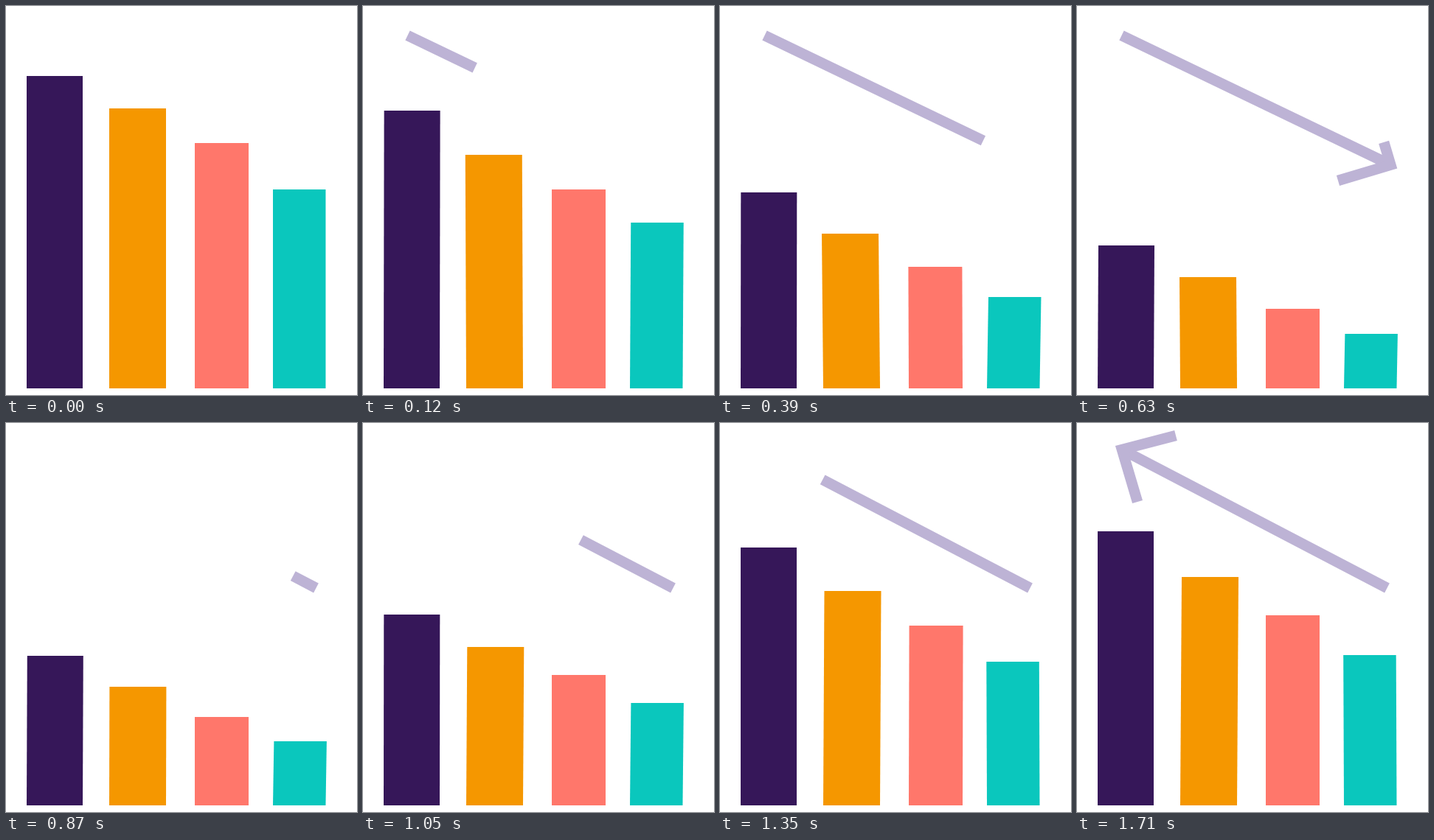
Write an HTML page with a canvas that moves like this. It is 476 by 528 pixels and loops after 2.04 s.

```html
<!DOCTYPE html>
<html lang="en">
<head>
<meta charset="utf-8">
<title>Bars and arrow</title>
<style>
  html, body { margin: 0; width: 100%; height: 100%; overflow: hidden; background: #fff; }
  canvas { display: block; }
</style>
</head>
<body>
<canvas id="stage" width="476" height="528"></canvas>
<script>
const ctx = document.getElementById('stage').getContext('2d');
const LOOP = 2040, STEP = 30, LAST = 1710, BASE = 519;

// Key times shared by all bars; top = y of the top edge, lean = x shift of the top edge.
const keys = [0, 240, 390, 630, 750, 1050, 1350, 1620];
const bars = [
  { color: '#361759', x: 28, w: 76,
    top: [95, 190, 253, 325, 335, 260, 169, 147],
    lean: [0, 1, 0.3, 1, 1, 0.3, 0, 0] },
  { color: '#f59700', x: 140, w: 77,
    top: [139, 259, 309, 368, 377, 304, 228, 209],
    lean: [0, -2, -2, -1, -0.4, 1.3, 1.5, 2] },
  { color: '#ff776b', x: 256, w: 73,
    top: [186, 306, 354, 411, 419, 342, 275, 261],
    lean: [0, 0, -0.6, 0, 0, 0, 0.6, 0] },
  { color: '#0ac7bd', x: 362, w: 71.5,
    top: [249, 339, 395, 445, 451, 380, 324, 315],
    lean: [0, 2, 2, 1.4, 1.4, 1.4, -0.7, -0.8] }
];

const arrows = [
  { from: 0, headAt: 480, done: 690, until: 810,
    line: [[60.5, 40], [425.3, 215.6]],
    head: [[354, 237], [425.3, 215.6], [404, 144]] },
  { from: 810, headAt: 1500, done: 1710, until: LOOP,
    line: [[420.5, 224], [61, 36.1]],
    head: [[134, 17], [61, 36.1], [82, 107]] }
];

const clamp01 = v => Math.max(0, Math.min(1, v));
const slope = (v, i) => (v[i + 1] - v[i]) / (keys[i + 1] - keys[i]);

// Tangent that never overshoots the key values.
function tangent(v, i) {
  if (i === 0) return slope(v, 0);
  if (i === keys.length - 1) return 0;
  const a = slope(v, i - 1), b = slope(v, i);
  return a * b <= 0 ? 0 : 2 * a * b / (a + b);
}

function curve(v, t) {
  const end = keys.length - 1;
  if (t >= keys[end]) return v[end];
  let i = 0;
  while (t >= keys[i + 1]) i++;
  const h = keys[i + 1] - keys[i], u = (t - keys[i]) / h, w = 1 - u;
  return v[i] * (1 + 2 * u) * w * w + v[i + 1] * u * u * (3 - 2 * u)
    + h * u * w * (tangent(v, i) * w - tangent(v, i + 1) * u);
}

function drawBar(bar, t) {
  const y = Math.round(curve(bar.top, t)), x = bar.x + curve(bar.lean, t);
  ctx.fillStyle = bar.color;
  ctx.beginPath();
  ctx.moveTo(x, y);
  ctx.lineTo(x + bar.w, y);
  ctx.lineTo(bar.x + bar.w, BASE);
  ctx.lineTo(bar.x, BASE);
  ctx.fill();
}

// Strokes the first part of a polyline, measured by length.
function trace(pts, part) {
  if (part <= 0) return;
  const lens = pts.slice(1).map((p, i) => Math.hypot(p[0] - pts[i][0], p[1] - pts[i][1]));
  let left = part * lens.reduce((a, b) => a + b);
  ctx.beginPath();
  ctx.moveTo(...pts[0]);
  for (let i = 0; i < lens.length && left > 0; i++) {
    const k = Math.min(1, left / lens[i]), [x, y] = pts[i], [nx, ny] = pts[i + 1];
    ctx.lineTo(x + (nx - x) * k, y + (ny - y) * k);
    left -= lens[i];
  }
  ctx.stroke();
}

function drawArrow(a, t) {
  if (t < a.from || t >= a.until) return;
  trace(a.line, clamp01((t - a.from) / (a.headAt - a.from)));
  trace(a.head, clamp01((t - a.headAt) / (a.done - a.headAt)));
}

function draw(t) {
  ctx.fillStyle = '#fff';
  ctx.fillRect(0, 0, 476, 528);
  bars.forEach(b => drawBar(b, t));
  ctx.strokeStyle = '#bdb3d5';
  ctx.lineWidth = 14.5;
  ctx.lineJoin = 'miter';
  arrows.forEach(a => drawArrow(a, t));
}

const start = performance.now();
function tick() {
  const t = (performance.now() - start) % LOOP;
  draw(Math.min(LAST, Math.floor(t / STEP) * STEP));
  requestAnimationFrame(tick);
}
tick();
</script>
</body>
</html>
```
